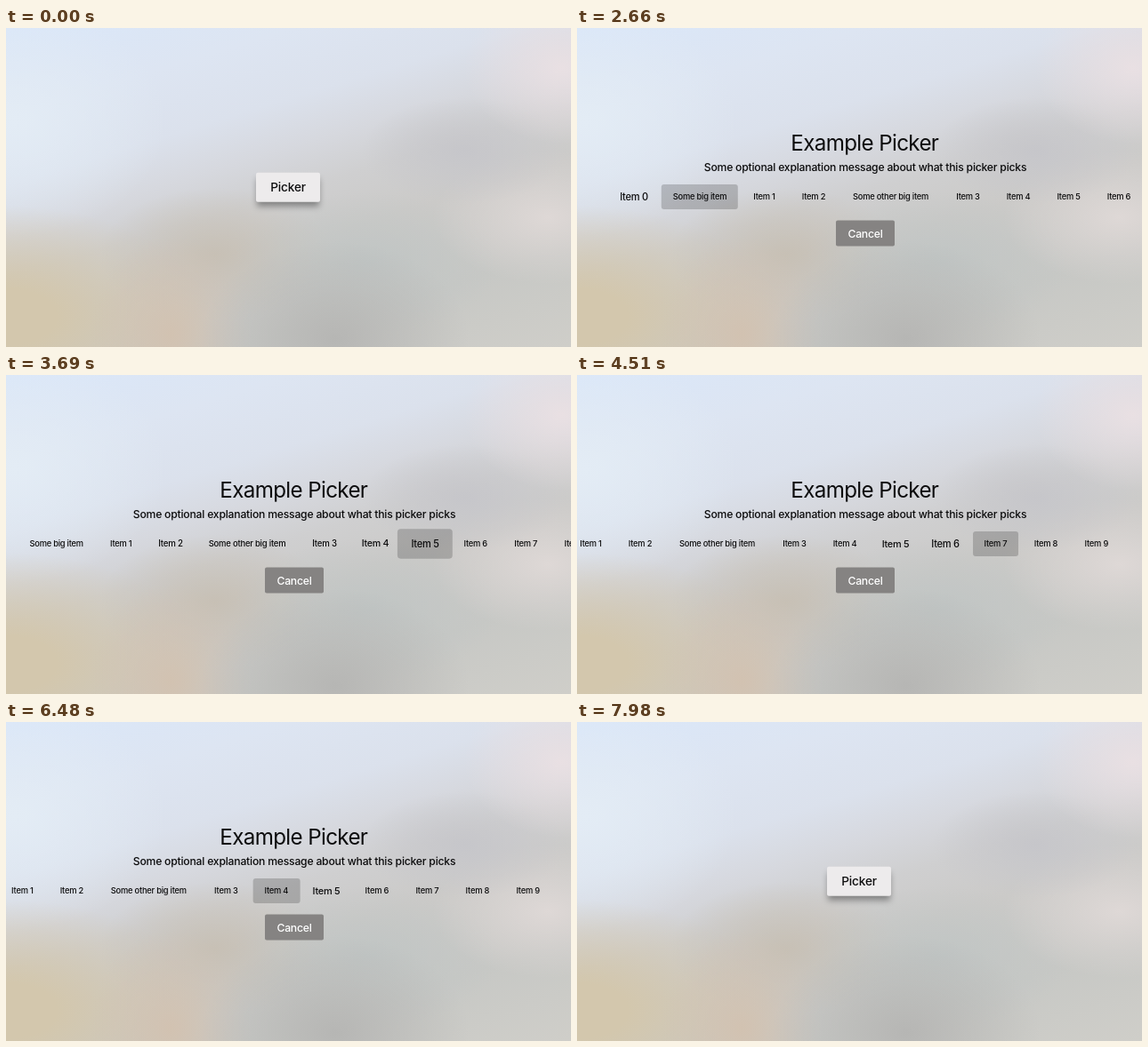
Write an HTML page that moves like this. It is 635 by 359 pixels and loops after 8780 ms.

```html
<!DOCTYPE html>
<html lang="en">
<head>
<meta charset="utf-8">
<title>Picker</title>
<style>
  html, body { margin: 0; width: 100%; height: 100%; overflow: hidden; }
  #stage {
    position: relative; width: 635px; height: 359px; overflow: hidden;
    font: 500 12.2px Inter, Roboto, sans-serif; letter-spacing: -.018em; color: #0c0c0d;
    background:
      radial-gradient(110px 85px at 625px 45px, #e9e0e3, #e9e0e300),
      radial-gradient(115px 60px at 515px 138px, #c6c6ca, #c6c6ca00),
      radial-gradient(130px 75px at 610px 213px, #ded8d6, #ded8d600),
      radial-gradient(150px 110px at 370px 350px, #b6b6b4, #b6b6b400),
      radial-gradient(150px 80px at 405px 265px, #c0c5c4, #c0c5c400),
      radial-gradient(90px 110px at 185px 345px, #d2c2b1, #d2c2b100),
      radial-gradient(130px 75px at 235px 255px, #c7c0b5, #c7c0b500),
      radial-gradient(230px 125px at 0 325px, #d3c7ad 25%, #d3c7ad00),
      radial-gradient(170px 130px at 10px 105px, #e3ecf5, #e3ecf500),
      linear-gradient(163deg, #dae7f9, #dde5f2 18%, #dbe1ec 32%, #d6d8de 42%,
        #cfcfd0 51%, #cbcac8 62%, #c7c8c5 80%, #cfcec9);
  }
  #picker, #home { position: absolute; inset: 0; }
  .at {
    position: absolute; transform: translate(-50%, -50%);
    white-space: nowrap; text-align: center;
  }
  .title { left: 323.3px; top: 128.5px; font-size: 24.2px; font-weight: 400; letter-spacing: -.027em; }
  .message { left: 324px; top: 156.3px; }
  .cancel {
    left: 324px; top: 230.5px; width: 66px; line-height: 29px;
    border-radius: 2px; background: #858382; color: #fff;
  }
  .item { top: 190px; padding: 0 13px; line-height: 28px; border-radius: 3px; font-size: 9.3px; }
  .face {
    left: 317px; top: 179.2px; width: 72px; line-height: 32.5px;
    border-radius: 2px; font-size: 13.6px; letter-spacing: -.01em;
  }
  .plain { background: #858382; color: #fff; }
  .lit { background: #edebec; }
</style>
</head>
<body>
<div id="stage">
  <div id="home">
    <div class="at face plain">Picker</div>
    <div class="at face lit">Picker</div>
  </div>
  <div id="picker">
    <div class="at title">Example Picker</div>
    <div class="at message">Some optional explanation message about what this picker picks</div>
    <div id="row"></div>
    <div class="at cancel">Cancel</div>
  </div>
</div>
<script>
const LOOP = 8780, GROW = 70, SHRINK = 330, FOCUS_SCALE = 1.19, PRESS_SCALE = 0.91;

// Bursts of movement: start, end, number of steps. The picture rests in between.
const bursts = [
  [660, 780, 3], [1190, 1470, 6], [1710, 1760, 2], [2660, 3170, 10], [3460, 3910, 9],
  [4510, 4970, 9], [5380, 6010, 12], [6420, 6810, 8], [7110, 7290, 4], [7410, 7640, 5],
  [7810, 7980, 4]
];

const labels = [
  ['Item 0', 63.5], ['Some big item', 138], ['Item 1', 210.5], ['Item 2', 266],
  ['Some other big item', 352.5], ['Item 3', 439.5], ['Item 4', 496], ['Item 5', 552.5],
  ['Item 6', 609], ['Item 7', 665.5], ['Item 8', 722], ['Item 9', 778.8]
];

// Time at which the focus lands on a row position.
const visits = [
  [1690, 0], [2660, 1], [2750, 2], [2840, 3], [3460, 4], [3485, 5], [3515, 6], [3580, 7],
  [4440, 8], [4510, 9], [4570, 10], [4640, 11], [5330, 10], [5380, 9], [5450, 8], [5585, 7],
  [6420, 6]
].map(([on, item], i, all) => ({ on, item, off: i + 1 < all.length ? all[i + 1][0] : Infinity }));

const $ = selector => document.querySelector(selector);
const home = $('#home'), picker = $('#picker'), plain = $('.plain'), lit = $('.lit');

const items = labels.map(([text, x]) => {
  const el = document.createElement('div');
  el.className = 'at item';
  el.textContent = text;
  $('#row').append(el);
  return { el, x };
});

const ramp = (t, from, to) => {
  const u = Math.min(1, Math.max(0, (t - from) / (to - from)));
  return u * u * (3 - 2 * u);
};
const mix = (a, b, u) => a + (b - a) * u;

function stepTime(t) {
  let held = 0;
  for (const [start, end, count] of bursts) {
    if (t < start) break;
    const step = (end - start) / (count - 1);
    held = Math.min(end, start + Math.floor((t - start) / step + 0.2) * step);
  }
  return held;
}

function focusLevel(index, t) {
  let level = 0;
  for (const { on, off, item } of visits) {
    if (item !== index || t < on) continue;
    const grown = ramp(Math.min(t, off), on, on + GROW);
    level = Math.max(level, grown * (1 - ramp(t, off, off + SHRINK)));
  }
  return level;
}

function drawRow(t) {
  const scroll = 195 * ramp(t, 3505, 3910) - 22.5 * ramp(t, 6380, 6810);
  const press = ramp(t, 7060, 7290) - ramp(t, 7360, 7640);
  const current = visits.find(v => t >= v.on && t < v.off);
  items.forEach(({ el, x }, i) => {
    const focused = current && current.item === i;
    let scale = mix(1, FOCUS_SCALE, focusLevel(i, t));
    if (focused) scale = mix(scale, PRESS_SCALE, press);
    el.style.left = x - scroll + 'px';
    el.style.transform = `translate(-50%, -50%) scale(${scale})`;
    el.style.background = focused ? 'rgba(0, 0, 0, .19)' : 'none';
  });
}

function drawHome(t) {
  const press = ramp(t, 610, 780) - ramp(t, 1140, 1470);
  const focus = t < 3000 ? 1 : ramp(t, 7760, 7980);
  const lift = focus * (1 - 0.7 * press);
  const scale = mix(0.9, 1, focus) * mix(1, 0.91, press);
  for (const el of [plain, lit]) el.style.transform = `translate(-50%, -50%) scale(${scale})`;
  plain.style.opacity = focus < 1 ? 1 : 0;
  lit.style.opacity = focus;
  lit.style.boxShadow = `0 ${6 * lift}px ${7 * lift}px ${-lift}px rgba(0, 0, 0, ${0.36 * lift})`;
}

function draw(now) {
  const t = stepTime(now % LOOP);
  const shown = ramp(t, 1140, 1470) - ramp(t, 7360, 7640);
  picker.style.opacity = shown;
  home.style.opacity = 1 - shown;
  drawRow(t);
  drawHome(t);
}

const begin = performance.now();
function tick() {
  draw(performance.now() - begin);
  requestAnimationFrame(tick);
}
tick();
</script>
</body>
</html>
```
